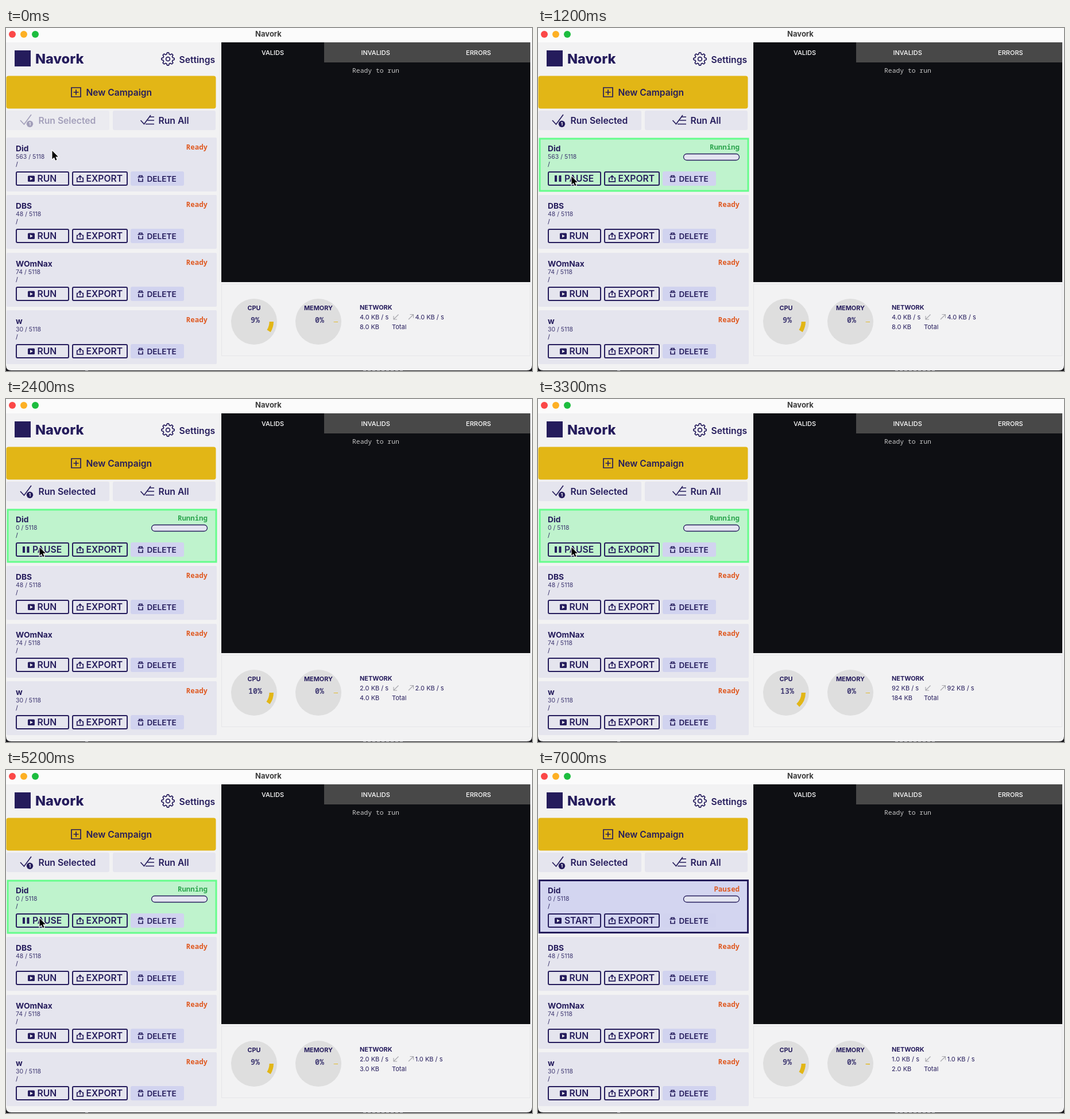
Animation of 916x598 px, one loop 7100 ms. Source, as an HTML page:

```html
<!DOCTYPE html>
<html lang="en">
<head>
<meta charset="utf-8">
<title>Navork</title>
<style>
  html, body { margin: 0; width: 100%; height: 100%; overflow: hidden; background: #16161a; }
  svg { display: block; width: 916px; height: 598px; font-family: Inter, sans-serif; fill: #251c5c; }
  text { white-space: pre; }
  .mono { font-family: "Noto Sans Mono", monospace; }
  .line { fill: none; stroke: #251c5c; stroke-width: 1.7; }
  #cursor { fill: #000; stroke: #fff; stroke-width: 2; paint-order: stroke; }
</style>
</head>
<body>
<svg viewBox="0 0 916 598">
  <g id="base"></g><g id="scene"></g>
  <path id="cursor" d="M0 0V14.5L3.4 11.5 5.6 16.8 8 15.8 5.8 10.6H10.3Z"/>
</svg>
<script>
const LOOP = 7100, NAVY = '#251c5c', CARD = '#e5e5ee', LILAC = '#d3d5f0', GOLD = '#e2b616';
const SELECT = 200, RUN = 1200, RESET = 2200, PAUSE = 3700, RESUME = 5000, STOP = 6000, LEAVE = 6700;

const domains = `officetechconsultants.com mayanutinstitute.org nationalresilienceinstitute.org
  linvarg.com email-support.co.uk bitsandscrews.com melbrookgalleryottawa.com stadhardenberg.nl
  medicalndx.com cinema-fanatic.com questco.net sourceindo.com leopardseals.org velmoroffice.co.uk
  pelisporno.xxx ohiotoday.org tavernishbrelanddorn.com nagsheadpier.com klindex.com.au
  boxkleedwinkel.nl`.split(/\s+/);

// start, CPU %, memory %, download, upload, total
const stats = [
  [0, 9, .5, '4.0 KB', '4.0 KB', '8.0 KB'],
  [1300, 11, .5, '0 bytes', '0 bytes', '0 bytes'],
  [2100, 10, .5, '2.0 KB', '2.0 KB', '4.0 KB'],
  [2900, 13, .5, '92 KB', '92 KB', '184 KB'],
  [3700, 12, .5, '0 bytes', '0 bytes', '0 bytes'],
  [4500, 9, .5, '2.0 KB', '1.0 KB', '3.0 KB'],
  [5900, 10, .5, '0 bytes', '0 bytes', '0 bytes'],
  [6700, 9, .7, '1.0 KB', '1.0 KB', '2.0 KB']
];

const modes = {
  ready: { status: 'Ready', action: 'RUN', fill: CARD, color: '#df5a22' },
  selected: { status: 'Ready', action: 'RUN', fill: LILAC, color: '#df5a22', border: NAVY },
  running: { status: 'Running', action: 'PAUSE', fill: '#bff3cd', color: '#2fa650', border: '#65fd8b', bar: true },
  paused: { status: 'Paused', action: 'START', fill: LILAC, color: '#df5a22', border: NAVY, bar: true }
};

const rect = (x, y, w, h, fill, extra = '') =>
  `<rect x="${x}" y="${y}" width="${w}" height="${h}" fill="${fill}" ${extra}/>`;
const circle = (x, y, r, fill, extra = '') => `<circle cx="${x}" cy="${y}" r="${r}" fill="${fill}" ${extra}/>`;
const line = (d, extra = '') => `<path class="line" d="${d}" ${extra}/>`;
const text = (s, x, y, size, weight = 400, extra = '') =>
  `<text x="${x}" y="${y}" font-size="${size}" font-weight="${weight}" ${extra}>${s}</text>`;
const MID = 'text-anchor="middle"';

function gear(cx, cy) {
  let d = '';
  for (let i = 0; i < 96; i++) {
    const a = i / 96 * 2 * Math.PI, r = 9.8 + 1.4 * Math.tanh(2.5 * Math.cos(8 * a));
    d += `${i ? 'L' : 'M'}${(cx + r * Math.cos(a)).toFixed(2)} ${(cy + r * Math.sin(a)).toFixed(2)}`;
  }
  return line(d + 'Z') + circle(cx, cy, 3.4, 'none', 'class="line"');
}

function actionIcon(action) {
  if (action === 'PAUSE') return rect(29, 66, 4, 11, NAVY) + rect(36.5, 66, 4, 11, NAVY);
  const x = action === 'RUN' ? 38 : 29;
  return rect(x, 66.5, 12, 10.5, NAVY, 'rx="1.5"') + `<path d="M${x + 4} 69v5.6l4.8-2.8Z" fill="#eee"/>`;
}

function card(index, name, count, modeName) {
  const m = modes[modeName], nudge = modeName === 'running' ? .5 : 0;
  const box = m.border
    ? rect(2.5 + nudge, 1.5 + nudge, 363, 91, m.fill, `stroke="${m.border}" stroke-width="3"`)
    : rect(1, 0, 366, 94, m.fill, 'rx="2"');
  const button = (x, w) => rect(x, 60, w, 23, 'none', `rx="2" stroke="${NAVY}" stroke-width="2"`);
  return `<g transform="translate(0 ${191 + Math.round(index * 100.4)})">` + box +
    text(name, 17, 24, 13.8, 700) +
    text(`${count} / 5118`, 17, 37, 10.5, 400, 'fill="#3d3670"') +
    text('/', 17, 50, 10.5) +
    text(m.status, 351, 21, 12.4, 700, `class="mono" text-anchor="end" fill="${m.color}"`) +
    (m.bar ? rect(253.5, 28.5, 97, 11, '#e3e4f0', `rx="5.5" stroke="${NAVY}" stroke-width="1.3"`) : '') +
    button(18, 91) + button(116, 95) + rect(217, 59, 93, 25, '#d1d3ef', 'rx="3"') +
    actionIcon(m.action) + text(m.action, m.action === 'RUN' ? 54.5 : 46, 77, 15.7, 600) +
    line('M126 70.5h-2.3v6.3h10.6v-6.3H132M129 74v-7M126 69.5l3-3 3 3') +
    text('EXPORT', 139.5, 77, 15.7, 600) +
    line('M229.5 69h10M232 68.5v-2h5v2M231 71.5v5h7v-5') +
    text('DELETE', 245.5, 77, 13.6, 600) + '</g>';
}

function gauge(cx, label, value, shown) {
  const a = value / 50 * Math.PI, r = 30.3;
  return circle(cx, 512, 40, '#dedede') +
    line(`M${cx + r} 512A${r} ${r} 0 0 1 ${cx + r * Math.cos(a)} ${512 + r * Math.sin(a)}`,
      `style="stroke:${GOLD};stroke-width:7.4"`) +
    text(label, cx, 492, 10.9, 700, MID) +
    text(shown + '%', cx + 2, 514, 13.3, 600, `class="mono" ${MID} fill="#484278"`);
}

function terminal(listed) {
  if (!listed) return text('Ready to run', 603, 78, 11.37, 400, 'class="mono" fill="#c6c6c6"');
  return '<clipPath id="view"><rect x="375" y="60" width="523" height="383"/></clipPath>' +
    '<g class="mono" fill="#cfcfcf" clip-path="url(#view)">' +
    domains.map((d, i) => text(d, 389.3, Math.floor(78 + i * 19.38), 11.37)).join('') + '</g>' +
    rect(898, 60, 15, 383, '#fafafa') + rect(902, 63, 8, 18, '#c1c1c1', 'rx="4"');
}

function runSelected(enabled) {
  return rect(1, 144, 179, 34, CARD, 'rx="3"' + (enabled ? '' : ' opacity=".5"')) +
    `<g opacity="${enabled ? 1 : .36}">` +
    line('M25 161l6.5 7L44 151') + circle(41.5, 167.3, 5.7, NAVY) +
    text('1', 41.4, 170.3, 8, 700, MID + ' fill="#fff"') +
    text('Run Selected', 56.5, 167, 15.7, 600) + '</g>';
}

const staticMarkup = () =>
  '<path d="M0 0H916V588q0 9-9 9H9q-9 0-9-9Z" fill="#f2f2f3"/>' +
  rect(0, 0, 916, 25, '#fbfbfb') +
  line('M138 597.5h7M622 597.5h70', 'stroke-dasharray="5 3" style="stroke:#77777c;stroke-width:1"') +
  ['#fb4848', '#fdb024', '#1dbd3f'].map((c, i) => circle(11 + 20 * i, 11, 6, c)).join('') +
  text('Navork', 457, 15, 13, 700, MID + ' fill="#3c3c3c"') +
  rect(15, 39, 28, 28, NAVY) + text('Navork', 51, 61.5, 23.6, 800) +
  gear(282, 54) + text('Settings', 301.5, 61, 15.7, 600) +
  rect(.5, 83.5, 365, 57, GOLD, 'rx="4"') +
  line('M114 104h16v16h-16ZM122 107.5v9M117.5 112h9') +
  text('New Campaign', 139.5, 118, 15.6, 600) +
  rect(186, 144, 179, 34, CARD, 'rx="3"') +
  line('M234.5 161l6 6.5L252 152M249 155h9M246.5 161h11.5M243 167.5h15') +
  text('Run All', 265.5, 167, 15.7, 600) +
  rect(375, 25, 538, 418, '#0e0f13') + rect(554, 25, 359, 35, '#484848') +
  ['VALIDS', 'INVALIDS', 'ERRORS'].map((s, i) =>
    text(s, 464.5 + 179.2 * i, 47, 11, 500, MID + ' fill="#fff"')).join('') +
  rect(375.5, 446.5, 537, 125, 'none', 'stroke="#e6e6e9"') +
  card(1, 'DBS', 48, 'ready') + card(2, 'WOmNax', 74, 'ready') + card(3, 'w', 30, 'ready') +
  text('NETWORK', 616, 491, 10.9, 700) + text('Total', 672, 525, 11) +
  line('M683.5 499.5l-8 8M675 502v6h6M701 508l8-8M703.5 499.5h6v6', 'style="stroke:#a5a5aa;stroke-width:1.1"');

function cardMode(t) {
  if (t < SELECT) return 'ready';
  if (t < RUN) return 'selected';
  return t < PAUSE || (t >= RESUME && t < STOP) ? 'running' : 'paused';
}

function sceneMarkup(t) {
  const [, cpu, memory, down, up, total] = stats.findLast(s => s[0] <= t);
  return runSelected(t >= SELECT) +
    card(0, 'Did', t < RESET ? 563 : 0, cardMode(t)) +
    terminal(t >= SELECT && t < RUN) +
    gauge(432, 'CPU', cpu, cpu) + gauge(544, 'MEMORY', memory, 0) +
    text(down + ' / s', 616, 508, 11) + text(up + ' / s', 712.5, 508, 11) +
    text(total, 616, 525, 11);
}

const sceneNode = document.getElementById('scene'), cursorNode = document.getElementById('cursor');
document.getElementById('base').innerHTML = staticMarkup();
let shown = '';

function frame(now) {
  const t = now % LOOP, markup = sceneMarkup(t);
  if (markup !== shown) sceneNode.innerHTML = shown = markup;
  const p = Math.min(1, Math.max(0, (t - 600) / 500)), e = p * p * (3 - 2 * p);
  cursorNode.setAttribute('transform', `translate(${80.5 - 22 * e} ${214 + 44.5 * e})`);
  cursorNode.style.display = t < LEAVE ? '' : 'none';
  requestAnimationFrame(frame);
}
frame(performance.now());
</script>
</body>
</html>
```
